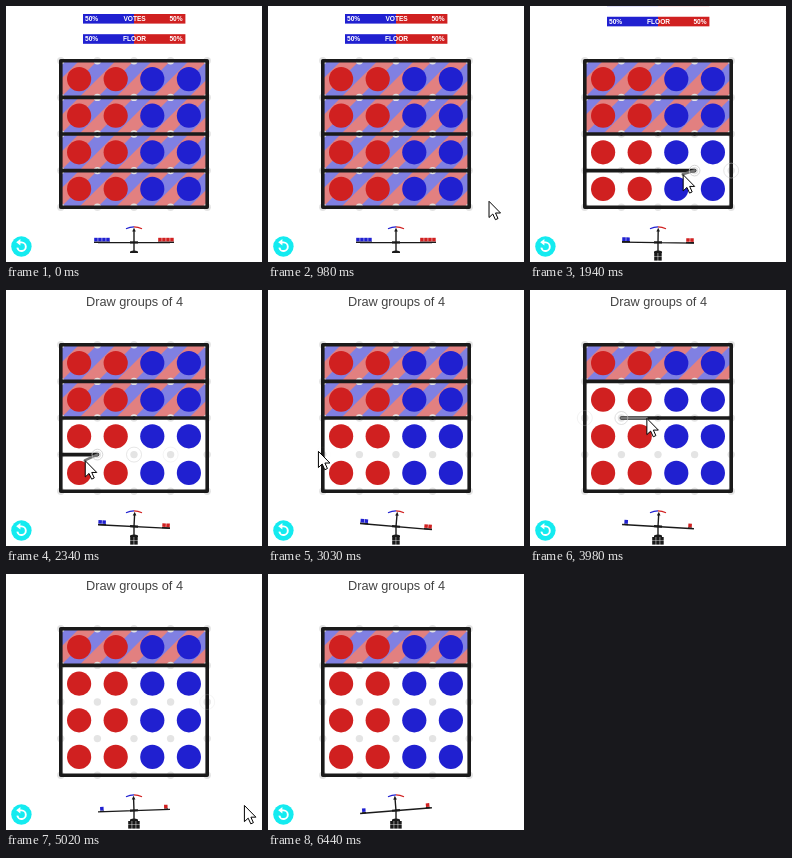
Write an HTML page that moves like this. It is 256 px wide and 256 px high and loops after 6540 ms.

```html
<!DOCTYPE html>
<html lang="en">
<head>
<meta charset="utf-8">
<title>Draw groups</title>
<style>
  html, body { margin: 0; width: 100%; height: 100%; overflow: hidden; background: #fff; }
  svg { display: block; width: 100vw; height: 100vh; }
  text { font-family: "Liberation Sans", Arial, sans-serif; }
  #bars text { font-size: 6.6px; font-weight: bold; fill: #fff; }
</style>
</head>
<body>
<svg id="stage" viewBox="0 0 256 256">
  <defs>
    <!-- Diagonal stripes, two per cell width -->
    <pattern id="tie" width="36.6" height="36.6" patternUnits="userSpaceOnUse"
             patternTransform="translate(54.8 54.8) rotate(45) scale(.70711)">
      <rect width="36.6" height="36.6" fill="#e28080"/>
      <rect width="18.3" height="36.6" fill="#8080e2"/>
    </pattern>
  </defs>
  <g id="bars"></g>
  <text id="title" x="128.5" y="16.3" font-size="12.75" text-anchor="middle" fill="#444">Draw groups of 4</text>
  <g id="rows"></g>
  <g id="dots" fill="#e4e4e4"></g>
  <g id="voters"></g>
  <g id="lines" stroke="#1a1a1a" stroke-width="3.6" stroke-linecap="round" fill="none"></g>
  <line id="drag" stroke="#777" stroke-width="2.6" stroke-linecap="round"/>
  <g id="rings" fill="none" stroke="#ccc"></g>

  <path d="M120 222.8Q124 220.8 128 220.8" fill="none" stroke="#2020d0" stroke-width="1.2"/>
  <path d="M128 220.8Q132 220.8 136 222.8" fill="none" stroke="#d02020" stroke-width="1.2"/>
  <path d="M128 236V246" stroke="#1a1a1a" stroke-width="1.4"/>
  <path d="M124 247V245.5Q128 243.5 132 245.5V247Z" fill="#1a1a1a"/>
  <g id="beam">
    <path d="M128 237V224M92 236.6H164" stroke="#1a1a1a" stroke-width="1.4"/>
    <path d="M126.2 225.5L128 221.8L129.8 225.5Z" fill="#1a1a1a"/>
    <path d="M124 236.4H132" stroke="#1a1a1a" stroke-width="2.2"/>
    <path id="pans" stroke="#1a1a1a" stroke-width="1.4"/>
    <g id="weights"></g>
  </g>
  <g id="spare"></g>

  <circle cx="15.4" cy="240.5" r="10.2" fill="#14ebf0"/>
  <path d="M13.5 236.4H15.6A4.3 4.3 0 1 1 11.3 241.6" fill="none" stroke="#fff" stroke-width="1.9"/>
  <path d="M14.4 233V239.6L10.2 236.3Z" fill="#fff"/>

  <path id="cursor" d="M0 0V16.2L3.8 12.7L6.4 18.4L9 17.2L6.5 11.7H11.5Z"
        fill="#fff" stroke="#000" stroke-linejoin="round"/>
</svg>
<script>
const LOOP = 6540, START = 54.8, CELL = 36.6, SIZE = 4 * CELL;
const RED = "#d02020", BLUE = "#2020d0", INK = "#1a1a1a";
const SNAP = 60; // a vertex reacts this many ms before the cursor is on it
const $ = id => document.getElementById(id);
const grid = i => START + i * CELL;
const clamp = v => Math.max(0, Math.min(1, v));
const ease = v => clamp(v) ** 2 * (3 - 2 * clamp(v));

function set(el, attrs) {
  for (const key in attrs) el.setAttribute(key, attrs[key]);
}
function add(parent, tag, attrs, text = "") {
  const el = document.createElementNS("http://www.w3.org/2000/svg", tag);
  set(el, attrs);
  el.textContent = text;
  return parent.appendChild(el);
}
const show = (el, on) => set(el, { visibility: on ? "visible" : "hidden" });

// Each drag wipes one divider at a steady speed, from one edge to the other.
const DRAGS = [
  { line: 3, dir: -1, from: 1680, to: 2470 },
  { line: 2, dir: 1, from: 3560, to: 4560 }
];
const vertexColumn = (drag, i) => drag.dir > 0 ? i : 4 - i;
const vertexTime = (drag, i) => drag.from + (drag.to - drag.from) * i / 4 - SNAP;
const [OPEN_TWO, OPEN_THREE] = DRAGS.map(d => vertexTime(d, 1));
const ROW_OPEN = [Infinity, OPEN_THREE, OPEN_TWO, OPEN_TWO];

const PATH = [
  { t: 750, x: 237, y: 218 },
  { t: 1300, x: 198, y: 163 },
  { t: 1600, x: 201, y: 167 },
  { t: DRAGS[0].from, x: 201, y: 167 },
  { t: DRAGS[0].to, x: 55, y: 171 },
  { t: 3030, x: 50, y: 161 },
  { t: DRAGS[1].from, x: 55, y: 128 },
  { t: DRAGS[1].to, x: 201, y: 128 },
  { t: 4780, x: 224, y: 136 },
  { t: 5020, x: 238, y: 231 },
  { t: 5480, x: 238, y: 257 }
];
function cursorAt(t) {
  const i = PATH.findIndex(p => t < p.t);
  if (i < 1) return null;
  const a = PATH[i - 1], b = PATH[i], u = (t - a.t) / (b.t - a.t);
  return { x: a.x + (b.x - a.x) * u, y: a.y + (b.y - a.y) * u };
}

// The beam starts to swing when the first groups break up.
const tilt = t => t < 1790 ? 0 : 5 * Math.sin(Math.PI * (t - 1790) / 2860);

["VOTES", "FLOOR"].forEach((label, i) => {
  const g = add($("bars"), "g", { transform: `translate(0 ${i * 20.2})` });
  add(g, "rect", { x: 77, y: 8, width: 51, height: 9.6, fill: BLUE });
  add(g, "rect", { x: 128, y: 8, width: 51.4, height: 9.6, fill: RED });
  add(g, "text", { x: 79, y: 15.2 }, "50%");
  add(g, "text", { x: 128.6, y: 15.2, "text-anchor": "middle" }, label);
  add(g, "text", { x: 176.6, y: 15.2, "text-anchor": "end" }, "50%");
});

const rows = [], segments = [], rings = [];
for (let r = 0; r < 4; r++) {
  rows.push(add($("rows"), "rect", { x: START, y: grid(r), width: SIZE, height: CELL, fill: "url(#tie)" }));
  for (let c = 0; c < 4; c++) {
    add($("voters"), "circle", { cx: grid(c + .5), cy: grid(r + .5), r: 12.1, fill: c < 2 ? RED : BLUE });
  }
}
for (let i = 0; i < 25; i++) {
  add($("dots"), "circle", { cx: grid(i % 5), cy: grid(Math.floor(i / 5)), r: 3.7 });
}
add($("lines"), "rect", { x: START, y: START, width: SIZE, height: SIZE, "stroke-linejoin": "round" });
add($("lines"), "path", { d: `M${START} ${grid(1)}h${SIZE}` });
for (const drag of DRAGS) {
  const cy = grid(drag.line);
  for (let i = 0; i <= 4; i++) {
    const cx = grid(vertexColumn(drag, i)), time = vertexTime(drag, i);
    rings.push({ el: add($("rings"), "circle", { cx, cy }), time });
    if (i) segments.push({ el: add($("lines"), "path", { d: `M${cx} ${cy}h${-drag.dir * CELL}` }), time });
  }
}

function drawBoxes(parent, x, y, count, cols, fill) {
  for (let i = 0; i < count; i++) {
    add(parent, "rect", {
      x: x + (i % cols - cols / 2) * 4 + .2, y: y + Math.floor(i / cols) * 4,
      width: 3.5, height: 3.6, fill
    });
  }
}

function drawScale(t) {
  const groups = t < OPEN_TWO ? 4 : t < OPEN_THREE ? 2 : 1;
  const open = 4 - groups, half = groups * 2;
  $("weights").replaceChildren();
  $("spare").replaceChildren();
  drawBoxes($("weights"), 96, 231.8, groups, groups, BLUE);
  drawBoxes($("weights"), 160, 231.8, groups, groups, RED);
  drawBoxes($("spare"), 128, 247, open * 2, open, INK);
  set($("pans"), { d: [96, 160].map(x => `M${x - half} 236.2h${half * 2}`).join("") });
  set($("beam"), { transform: `rotate(${tilt(t)} 128 236.6)` });
}

function drawPointer(t) {
  const tip = cursorAt(t), drag = DRAGS.find(d => t >= d.from && t < d.to - SNAP);
  show($("cursor"), tip);
  show($("drag"), drag);
  if (tip) set($("cursor"), { transform: `translate(${tip.x + .4} ${tip.y + .4})` });
  if (drag) {
    const passed = Math.floor(4 * (t + SNAP - drag.from) / (drag.to - drag.from));
    set($("drag"), { x1: grid(vertexColumn(drag, passed)), y1: grid(drag.line), x2: tip.x, y2: tip.y });
  }
}

function draw(t) {
  const barsOut = ease((t - OPEN_TWO) / 270), titleIn = ease((t - OPEN_TWO - 240) / 270);
  set($("bars"), { transform: `translate(0 ${-40 * barsOut})` });
  set($("title"), { transform: `translate(0 ${-22 * (1 - titleIn)})` });
  rows.forEach((el, r) => show(el, t < ROW_OPEN[r]));
  segments.forEach(s => show(s.el, t < s.time));
  rings.forEach(({ el, time }) => {
    const u = (t - time) / 650;
    show(el, u > 0 && u < 1);
    set(el, { r: 4 + 3.5 * clamp(u * 2), opacity: clamp(1 - u) });
  });
  drawScale(t);
  drawPointer(t);
}

const origin = performance.now();
function tick() {
  draw((performance.now() - origin) % LOOP);
  requestAnimationFrame(tick);
}
draw(0);
requestAnimationFrame(tick);
</script>
</body>
</html>
```
